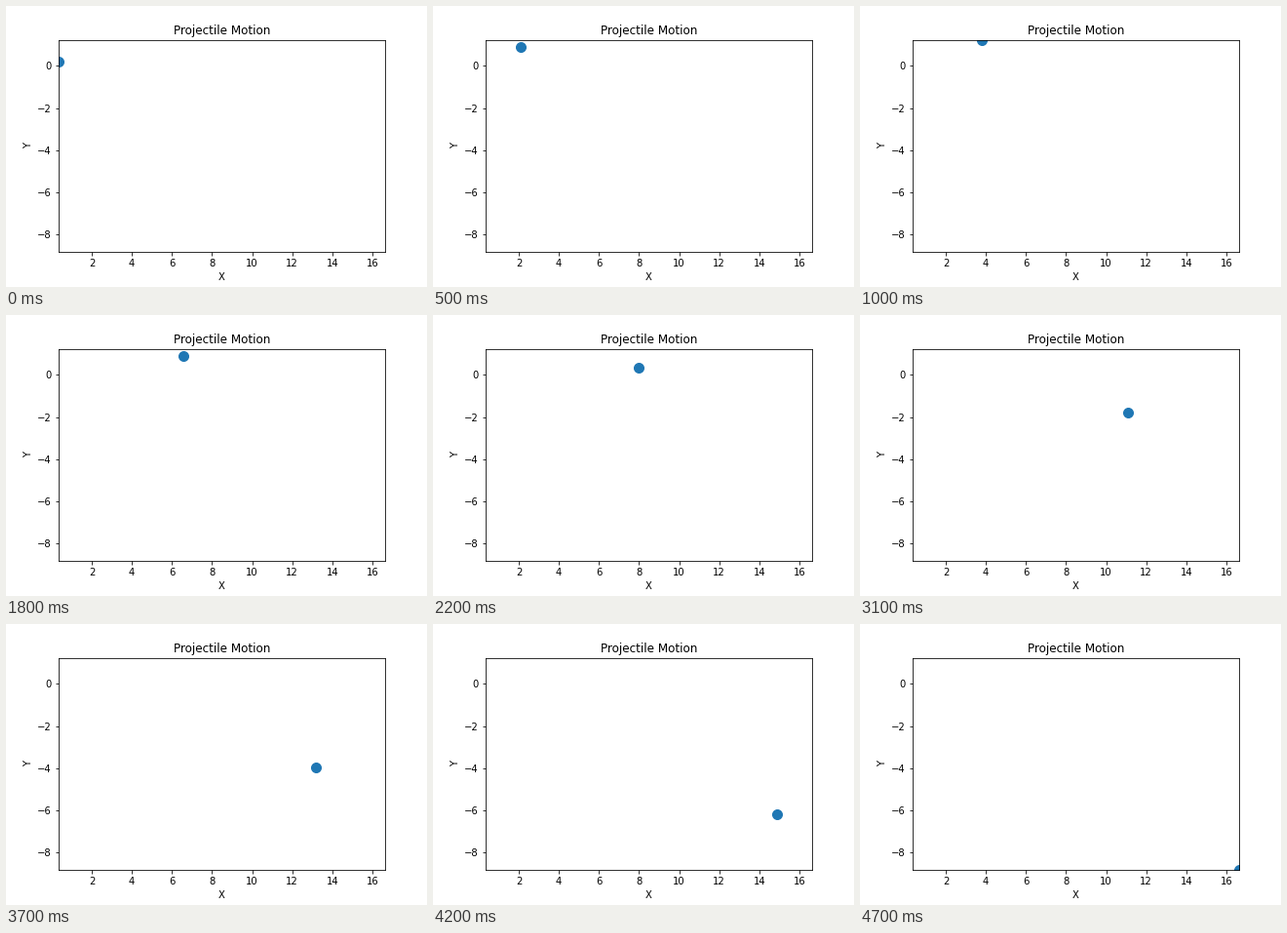
Animation, 432 px wide and 288 px high, one loop 4.8 s. Source, as a matplotlib script:

```python
import numpy as np
import matplotlib.pyplot as plt
from matplotlib.animation import FuncAnimation

plt.rcParams["font.family"] = "DejaVu Sans"

SPEED, ANGLE, G = 10, np.radians(30), 10
FRAMES, STEP = 48, 0.04

t = STEP * np.arange(1, FRAMES + 1)
x = SPEED * np.cos(ANGLE) * t
y = SPEED * np.sin(ANGLE) * t - G * t**2 / 2

fig, ax = plt.subplots(figsize=(6, 4), dpi=72)
fig.subplots_adjust(left=0.125, right=0.9, bottom=0.125, top=0.88)
ax.set(xlim=(x.min(), x.max()), ylim=(y.min(), y.max()),
       xlabel="X", ylabel="Y", title="Projectile Motion")
ball, = ax.plot(x[:1], y[:1], "o", color="C0", markersize=10)


def update(i):
    ball.set_data([x[i]], [y[i]])
    return ball,


anim = FuncAnimation(fig, update, frames=FRAMES, interval=100,
                     repeat=True, repeat_delay=0)
plt.show()
```
